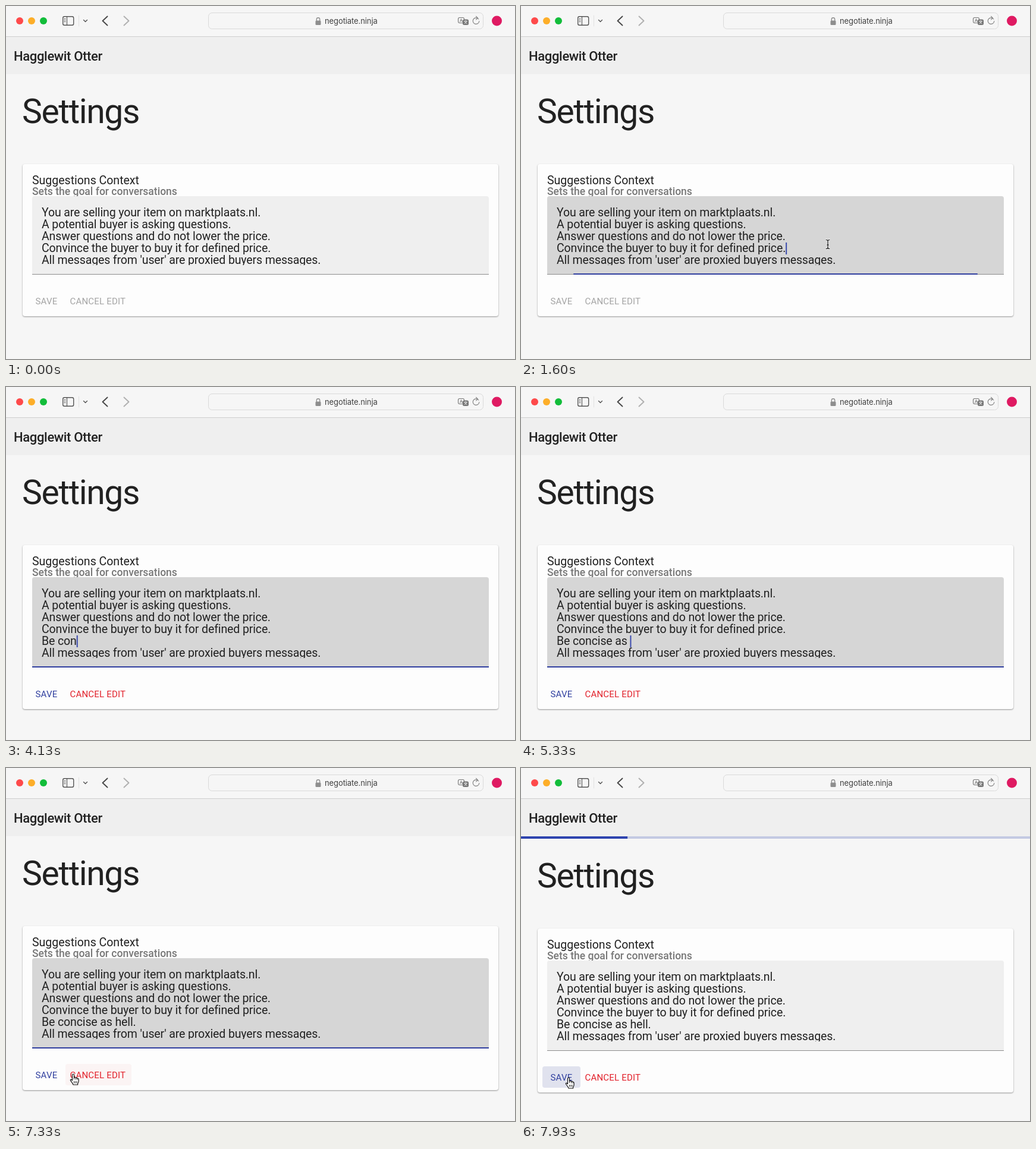
An HTML page that plays this animation: 856 px wide and 594 px high, repeating every 8000 ms.

```html
<!DOCTYPE html>
<html lang="en">
<head>
<meta charset="utf-8">
<title>Settings</title>
<style>
  html, body { margin: 0; width: 100%; height: 100%; overflow: hidden; background: #f6f6f6; }
  svg { display: block; width: 856px; height: 594px; }
  text { font-family: Roboto, Arial, sans-serif; fill: #212121; white-space: pre; }
  .input text { font-size: 19.5px; letter-spacing: -.12px; }
  .button { font-size: 15px; letter-spacing: .2px; }
  .icon { fill: none; stroke: #555; stroke-width: 1.4; stroke-linecap: round; stroke-linejoin: round; }
  .card { fill: #fdfdfd; filter: drop-shadow(0 1px 1px rgba(0, 0, 0, .4)); }
</style>
</head>
<body>
<svg viewBox="0 0 856 594">
  <defs><clipPath id="clip"><rect id="clipBox" x="60" y="330" width="740" height="106"/></clipPath></defs>
  <rect width="856" height="594" fill="#f6f6f6"/>

  <!-- browser toolbar -->
  <rect y="51" width="856" height="1" fill="#cfcfcf"/>
  <circle cx="23" cy="25" r="6" fill="#fe4a4b"/>
  <circle cx="43" cy="25" r="6" fill="#fdae29"/>
  <circle cx="63" cy="25" r="6" fill="#12bd3a"/>
  <g class="icon">
    <rect x="95.7" y="17.7" width="18" height="14.6" rx="2.5"/>
    <path d="M102.5 18v14M98 21.5h2M98 24h2M98 26.5h2" stroke-width="1.1"/>
    <path d="M122.500 16v18" stroke="#e2e2e2" stroke-width="1"/>
    <path d="M130.500 23.500l3 3 3-3"/>
    <path d="M170.500 17.500l-8 7.500 8 7.500" stroke="#484848" stroke-width="1.9"/>
    <path d="M198.500 17.500l8 7.500-8 7.500" stroke="#b0b0b0" stroke-width="1.9"/>
    <rect x="340.500" y="11.500" width="462" height="27" rx="6" stroke="#dadada" stroke-width="1"/>
    <path d="M522.300 25v-2.500a2.700 2.700 0 0 1 5.400 0v2.500" stroke="#8e8e8e"/>
    <path d="M794.800 22a5.300 5.300 0 1 0 1 3.500M790.500 17.500l3 2.700-3 2.700" stroke="#858585" stroke-width="1.200"/>
    <rect x="760.500" y="19.500" width="10" height="9" rx="2.500" stroke="#777" stroke-width="1.100"/>
    <path d="M763.500 26.500l2-5 2 5M764.300 25h2.500" stroke="#777" stroke-width=".9"/>
    <rect x="768" y="22.500" width="10" height="9.500" rx="2.500" fill="#777" stroke="none"/>
    <path d="M770.500 25.500h5M773 24.500v1M775 25.500q-1 3-4 4M771.500 26.500q1 2 3.500 3" stroke="#f6f6f6" stroke-width=".8"/>
  </g>
  <rect x="520.500" y="24.500" width="9" height="7.500" rx="1.500" fill="#8e8e8e"/>
  <text x="536" y="30" style="font: 13px Inter, sans-serif; letter-spacing: -.1px; fill: #404040">negotiate.ninja</text>
  <circle cx="825.500" cy="25" r="8.500" fill="#df1a62"/>

  <!-- app header -->
  <rect y="52" width="856" height="62.500" fill="#efefef"/>
  <text x="13" y="92" font-size="22" font-weight="500" letter-spacing="-.35">Hagglewit Otter</text>
  <g id="progress">
    <rect y="114" width="856" height="1" fill="#efefef"/>
    <rect y="115" width="856" height="4" fill="#c3c9e2"/>
    <rect id="bar" y="115" height="4" fill="#2e43ae"/>
  </g>

  <g id="page">
    <text x="27" y="197" font-size="57" letter-spacing="-1.4">Settings</text>
    <rect id="card" class="card" x="28" y="266" width="800" height="256" rx="4"/>
    <text x="44" y="300" font-size="19.500">Suggestions Context</text>
    <text x="44" y="318" font-size="17.500" font-weight="500" style="fill: #777">Sets the goal for conversations</text>
    <path id="field"/>
    <g class="input" clip-path="url(#clip)">
      <text x="60" y="354">You are selling your item on marktplaats.nl.</text>
      <text x="60" y="374">A potential buyer is asking questions.</text>
      <text x="60" y="394">Answer questions and do not lower the price.</text>
      <text id="above" x="60" y="414">Convince the buyer to buy it for defined price.</text>
      <text id="typed" x="60" y="434"></text>
      <text id="last" x="60">All messages from 'user' are proxied buyers messages.</text>
    </g>
    <rect id="caret" width="2" height="20" fill="#3c4cae"/>
    <g id="foot">
      <rect id="line" x="44" y="451" width="768" height="1"/>
      <rect id="focus" y="450" height="2" fill="#303f9f"/>
      <rect id="saveBg" x="36" y="478" width="64" height="36" rx="4"/>
      <rect id="cancelBg" x="100" y="478" width="111" height="36" rx="4" fill="#fbf4f4"/>
      <text id="save" class="button" x="49.500" y="502">SAVE</text>
      <text id="cancel" class="button" x="107.500" y="502">CANCEL EDIT</text>
    </g>
  </g>

  <g id="pointer">
    <g id="beam" fill="none" stroke-linecap="round">
      <path d="M-3-7.500q3 0 3 2v11q0 2-3 2M3-7.500q-3 0-3 2m0 11q0 2 3 2M-1.500 1h3" stroke="#fff" stroke-width="2.600"/>
      <path d="M-3-7.500q3 0 3 2v11q0 2-3 2M3-7.500q-3 0-3 2m0 11q0 2 3 2M-1.500 1h3" stroke="#111" stroke-width="1.200"/>
    </g>
    <path id="arrow" d="M0 0v14l3.200-3 2.200 5 2.200-1-2.200-4.800h4.400z" fill="#000" stroke="#fff"/>
    <g id="hand" stroke="#111" stroke-width="1.200" stroke-linejoin="round">
      <path fill="#fff" d="M-1.500 1.500q0-1.500 1.500-1.500q1.500 0 1.500 1.500v4.500q2.500-1 3 .6q2-.8 2.600.8q2-.4 2 1.600v3q0 2-1.500 4v2h-7.500q-.5-2-4.500-7q-.8-1.800 1-2l1.900 1.700z"/>
      <path fill="none" d="M1.500 6v3M4.500 7v2.500M7.100 7.700v2M1.500 12v3.500M3.800 12v3.500M6 12v3.500" stroke-width=".9"/>
    </g>
  </g>
</svg>
<script>
const LOOP = 8000, ENTER = 2070, FOCUS = 1600, BLUR = 7600, LOADING = 7820;
const PHRASE = "Be concise as hell.";
const KEYS = [3070, 3200, 3400, 3730, 3930, 4070, 4200, 4400, 4600, 4730,
  4870, 5070, 5200, 5330, 5870, 6000, 6100, 6200, 6400];
// time, x, y
const PATH = [[400, 530, 473], [600, 520, 402], [870, 520, 402], [1400, 516, 401],
  [6730, 516, 401], [7200, 150, 512], [7330, 113, 515], [7530, 80, 521]];

const el = id => document.getElementById(id);
const set = (id, attrs) => {
  for (const name in attrs) el(id).setAttribute(name, attrs[name]);
};
const show = (id, on) => set(id, { visibility: on ? "visible" : "hidden" });
const ramp = (t, from, to) => Math.min(1, Math.max(0, (t - from) / (to - from)));
const ease = p => p * p * (3 - 2 * p);
const mix = (a, b, p) => a + (b - a) * p;
const blend = (a, b, p) => `rgb(${a.map((v, i) => Math.round(mix(v, b[i], p)))})`;
const gray = v => [v, v, v];

function pointerAt(t) {
  let i = 0;
  while (i < PATH.length - 2 && t > PATH[i + 1][0]) i++;
  const [a, b] = [PATH[i], PATH[i + 1]];
  const p = ease(ramp(t, a[0], b[0]));
  return [mix(a[1], b[1], p), mix(a[2], b[2], p)];
}

function drawField(t, grow) {
  const hover = ramp(t, 400, 600), blur = ramp(t, BLUR, BLUR + 200);
  const focused = t >= FOCUS;
  const shade = focused ? mix(214, 239, blur) : mix(239, 231, hover);
  set("field", {
    d: `M44 ${452 + grow}V324q0-4 4-4h760q4 0 4 4V${452 + grow}z`,
    fill: blend(gray(shade), gray(shade), 0)
  });
  set("line", { fill: blend(gray(140), gray(33), focused ? 0 : hover) });

  const open = focused ? (1 - .117 * (1 - ramp(t, FOCUS, FOCUS + 130)) ** 2) * (1 - blur) : 0;
  set("focus", { x: 428 - 384 * open, width: 768 * open });
  set("clipBox", { height: 106 + grow });
  set("last", { y: 434 + grow });
}

function drawTyping(t) {
  const typed = PHRASE.slice(0, KEYS.filter(k => k <= t).length);
  if (el("typed").textContent !== typed) el("typed").textContent = typed;
  const row = el(t < ENTER ? "above" : "typed");
  const length = row.textContent ? row.getComputedTextLength() : 0;
  set("caret", { x: 60 + length, y: t < ENTER ? 398 : 418 });
  show("caret", t >= FOCUS && t < BLUR && !(t >= 6900 && t < 7400));
}

function drawPointer(t) {
  const [x, y] = pointerAt(t);
  const moving = t >= 6730;
  const overButton = moving && y > 498 && x < 211;
  const overField = y < (moving ? 472 : 452);
  const visible = moving || (t >= 400 && t < ENTER);
  set("pointer", { transform: `translate(${x} ${y})` });
  show("hand", visible && overButton);
  show("beam", visible && overField);
  show("arrow", visible && !overButton && !overField);
  show("cancelBg", overButton && x >= 100);
  show("saveBg", overButton && x < 100);
  set("saveBg", { fill: blend([244, 245, 250], [224, 226, 238], ramp(t, BLUR, BLUR + 200)) });
}

function draw(t) {
  const grow = t < ENTER ? 0 : 20, loading = t >= LOADING;
  const active = ramp(t, ENTER, ENTER + 250);
  set("card", { height: 256 + grow });
  set("foot", { transform: `translate(0 ${grow})` });
  set("page", { transform: `translate(0 ${loading ? 4 : 0})` });
  show("progress", loading);
  set("bar", { width: 856 * 1.9 * 1.25 * Math.max(0, t - LOADING) / 1260 });
  el("save").style.fill = blend(gray(164), [48, 63, 159], active);
  el("cancel").style.fill = blend(gray(164), [226, 32, 42], active);
  drawField(t, grow);
  drawTyping(t);
  drawPointer(t);
}

const start = performance.now();
function tick() {
  draw((performance.now() - start) % LOOP);
  requestAnimationFrame(tick);
}
tick();
</script>
</body>
</html>
```
